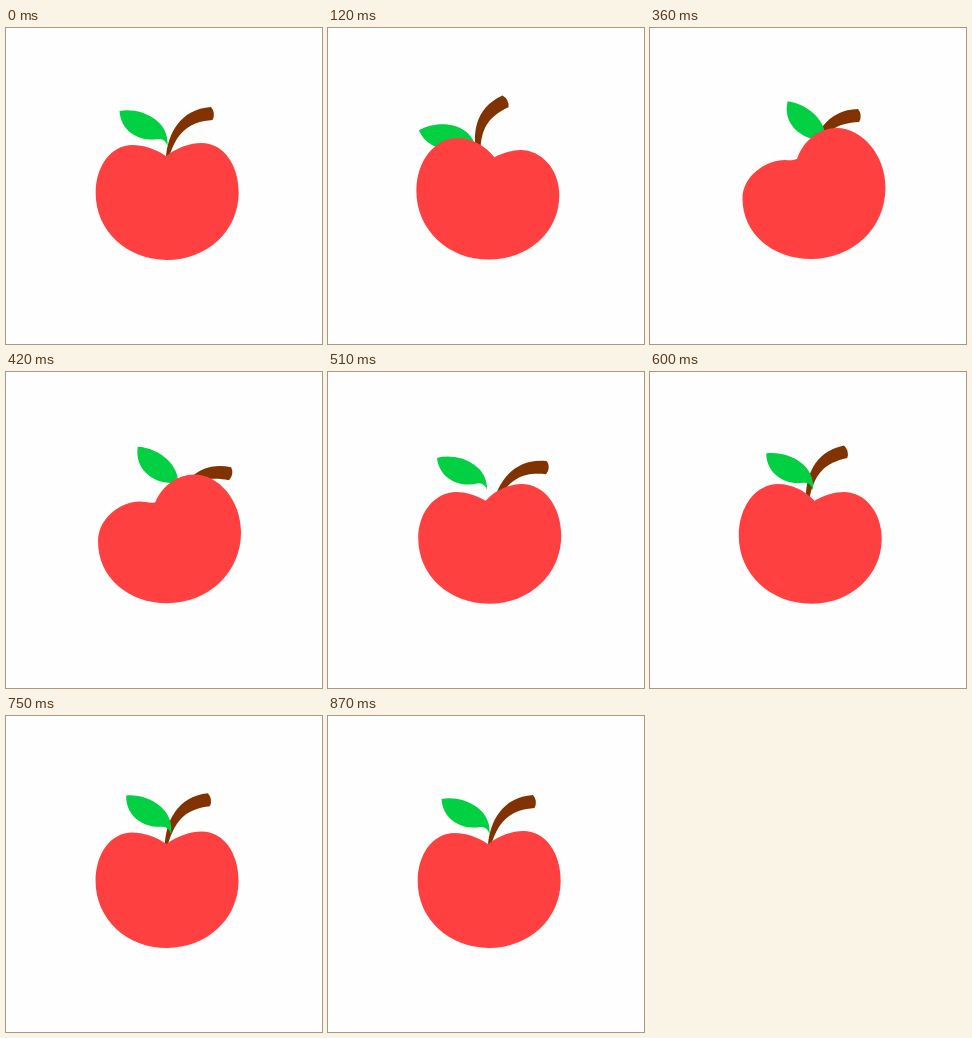
Write an HTML page that moves like this. It is 316 px wide and 316 px high and loops after 0.9 s.

```html
<!DOCTYPE html>
<html lang="en">
<head>
<meta charset="utf-8">
<title>Wobbling apple</title>
<style>
  html, body { margin: 0; width: 100%; height: 100%; overflow: hidden; background: #fefefe; }
  svg { display: block; width: 100%; height: 100%; }
</style>
</head>
<body>
<svg viewBox="0 0 316 316">
  <path id="stem" fill="#803300" d="M160 129C162 106 174 81 205 79Q210 85 206.5 92C184 94 172 102 163 129Z"/>
  <path id="leaf" fill="#00d042" d="M113.5 83C134 79 164 92 161.5 118Q159 110 152 111C137 114 115 106 113.5 83Z"/>
  <path id="body" fill="#ff4040"/>
</svg>
<script>
const LOOP = 900, STEP = 30;
const PIVOT = "158 158";
const MID = 161;
const part = id => document.getElementById(id);

// Turning points of each swing: [ms, value].
const BODY = [[0, .06], [100, -.4], [360, 1], [630, -.29], [780, .06]];
const STEM = [[0, 0], [210, -33.4], [450, 18.2], [622, -8.8], [815, 0]];
const LEAF = [[0, 0], [198, -29.6], [375, 18], [520, -3.8], [680, 7.8], [850, 0]];

function swing(keys, t) {
  const i = keys.findIndex(k => k[0] > t);
  if (i < 0) return keys[keys.length - 1][1];
  const [t0, a] = keys[i - 1], [t1, b] = keys[i];
  return a + (b - a) * (1 - Math.cos(Math.PI * (t - t0) / (t1 - t0))) / 2;
}

// One half of the apple from notch to bottom; the lobe on the leaning side (k > 0) rises.
function half(side, lean) {
  const k = side * lean, bend = Math.abs(lean);
  const notchX = -14 * k, notchY = 128 + 3 * bend;
  const topX = 35 - 9 * bend, topY = 116 - 16 * k;
  const edgeX = 71.5 + 3 * k, edgeY = 165 - 5.5 * k;
  const low = 232 - bend;
  return [
    [notchX, notchY], [notchX + 11 - 5 * bend, notchY - 8 - 10 * k],
    [topX - 11 - 7 * k, topY], [topX, topY], [topX + 21.5 + 3 * k, topY],
    [edgeX, edgeY - 28 - 5 * k], [edgeX, edgeY], [edgeX, edgeY + 38 + 2.5 * k],
    [40 + 2 * k, low], [0, low]
  ].map(([x, y]) => [MID + side * x, y]);
}

function bodyPath(lean) {
  const right = half(1, lean), left = half(-1, lean).reverse();
  const [first, ...rest] = [...right, ...left.slice(1)];
  return `M${first}C${rest.join(" ")}Z`;
}

function turn(id, keys, t) {
  part(id).setAttribute("transform", `rotate(${swing(keys, t)} ${PIVOT})`);
}

function draw(now) {
  const t = Math.floor(now % LOOP / STEP) * STEP;
  part("body").setAttribute("d", bodyPath(swing(BODY, t)));
  turn("stem", STEM, t);
  turn("leaf", LEAF, t);
}

const start = performance.now();
function tick() {
  draw(performance.now() - start);
  requestAnimationFrame(tick);
}
tick();
</script>
</body>
</html>
```
